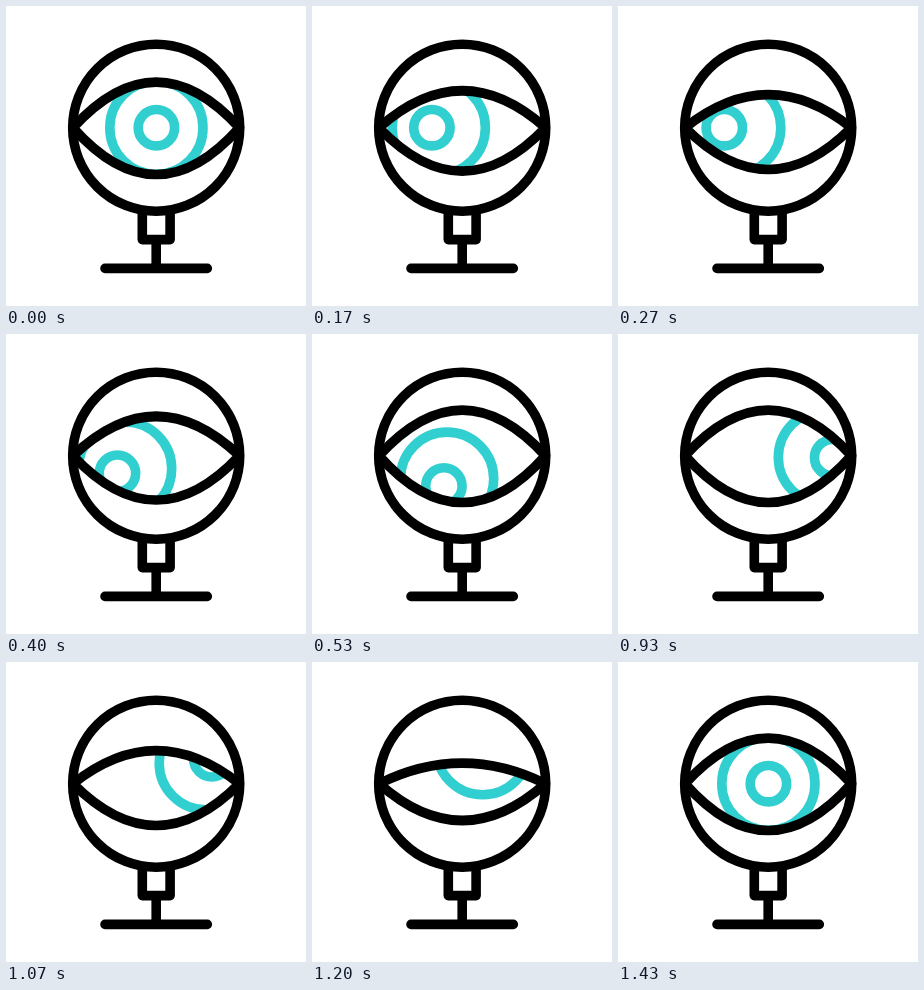
Animation of 300 by 300 pixels, one loop 1670 ms. Source, as an HTML page:

```html
<!DOCTYPE html>
<html lang="en">
<head>
<meta charset="utf-8">
<title>Looking eye</title>
<style>
  html, body { margin: 0; width: 100%; height: 100%; overflow: hidden; background: #fff; }
  svg { display: block; width: 100vw; height: 100vh; }
</style>
</head>
<body>
<svg viewBox="0 0 300 300" fill="none" stroke-width="9.6" stroke-linecap="round" stroke-linejoin="round">
  <clipPath id="opening"><path id="hole"/></clipPath>
  <g clip-path="url(#opening)" stroke="#32cfd0">
    <circle id="iris" r="46.6"/>
    <circle id="pupil" r="18.2"/>
  </g>
  <g stroke="#000">
    <circle cx="150.2" cy="121.7" r="83.5"/>
    <path id="lids"/>
    <path d="M136.3 206V233.6H164.1V206M150.2 234V262M99 262.4H201.3"/>
  </g>
</svg>
<script>
const LOOP = 1670, FPS = 30;
const CX = 150.4, CY = 121.7;
// The eye glances left, rolls round along the bottom to the top, then returns
const ROLL = 8, BACK = 36, END = 43;
const get = id => document.getElementById(id);
const iris = get('iris'), pupil = get('pupil'), hole = get('hole'), lids = get('lids');

const clamp = u => Math.max(0, Math.min(1, u));
const ease = (s, from, to) => (1 - Math.cos(Math.PI * clamp((s - from) / (to - from)))) / 2;
const bump = (s, from, peak, to) => ease(s, from, peak) - ease(s, peak, to);

// Steady turn from left to top, lingering at the bottom
function direction(s) {
  const turn = 252 * clamp((s - ROLL) / (BACK - ROLL));
  return (180 - turn + 19 * bump(s, 14, 22, 30)) * Math.PI / 180;
}

// The roll spirals outward from the first glance
function reach(s, glance) {
  const grow = (1.15 - glance) * clamp((s - ROLL) / (BACK - ROLL));
  return glance * ease(s, 0, ROLL) + grow - 1.15 * ease(s, BACK, END);
}

function place(ring, s, glance, rx, ry) {
  const a = direction(s), r = reach(s, glance);
  ring.setAttribute('cx', CX + rx * r * Math.cos(a));
  ring.setAttribute('cy', CY + ry * r * Math.sin(a));
}

function draw(ms) {
  const s = Math.min(END, Math.floor((ms % LOOP + 4) * FPS / 1000));
  const blink = 0.5 * bump(s, 0, ROLL, 16) + bump(s, 28, BACK, END);
  const top = 30.5 + 50 * blink, bottom = 215.4 - 20 * blink;
  const eye = `M67 ${CY}Q150.2 ${top} 233.4 ${CY}Q150.2 ${bottom} 67 ${CY}Z`;
  hole.setAttribute('d', eye);
  lids.setAttribute('d', eye);
  place(iris, s, 0.6, 57, 32.5);
  place(pupil, s, 0.7, 63, 39);
}

const start = performance.now();
function tick() {
  draw(performance.now() - start);
  requestAnimationFrame(tick);
}
tick();
</script>
</body>
</html>
```
